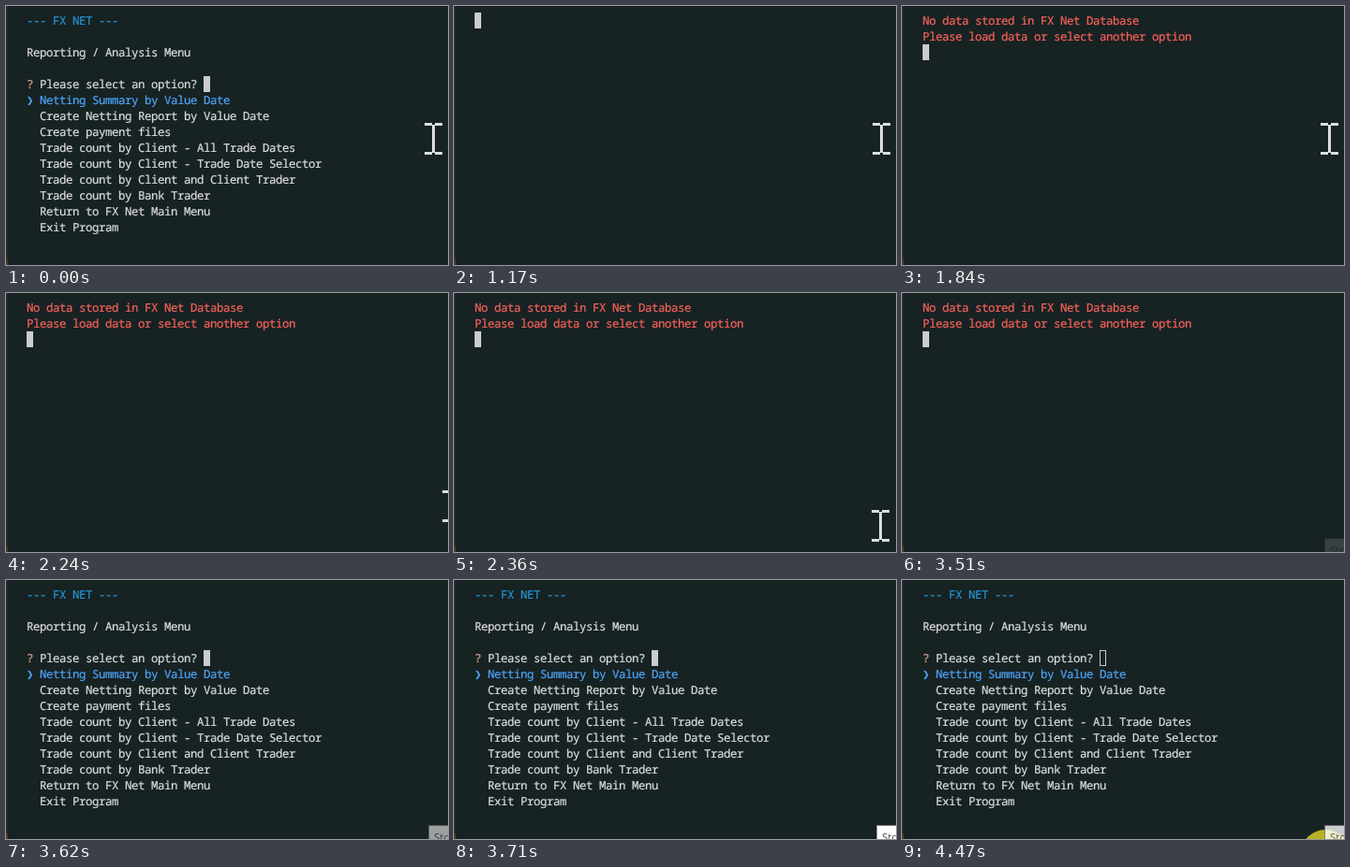
Animation of 472 by 277 pixels, one loop 4500 ms. Source, as an HTML page:

```html
<!DOCTYPE html>
<html lang="en">
<head>
<meta charset="utf-8">
<title>Terminal menu</title>
<style>
  html, body { margin: 0; width: 100%; height: 100%; overflow: hidden; background: #172223; }
  svg { display: block; width: 472px; height: 277px; }
  .term text {
    font: 500 12.3px "Noto Sans Mono", "DejaVu Sans Mono", monospace;
    letter-spacing: -.38px;
    text-rendering: geometricPrecision;
    white-space: pre;
    stroke-width: .2px;
  }
  #tip text { font: 11.5px "Open Sans", "Noto Sans", sans-serif; fill: #4c4c4c; }
</style>
</head>
<body>
<svg viewBox="0 0 472 277">
  <rect width="472" height="277" fill="#172223"/>
  <rect width="2" height="277" fill="#22282b"/>
  <rect y="271" width="2" height="6" fill="#4a3524"/>
  <g id="menu" class="term"></g>
  <g id="alert" class="term"></g>
  <rect id="caret" width="6" height="16" stroke="#cccccc"/>
  <circle id="click" cx="452" cy="293" r="26" fill="#b9b224"/>
  <g id="tip">
    <rect x="451.5" y="262.5" width="40" height="24" fill="#fff" stroke="#7a7a7a"/>
    <text x="457" y="279">Stop</text>
  </g>
  <path id="beam" fill="#dcdcdc" d="M0 0h8v3h-8zM11 0h8v3h-8zM8 2h3v30h-3zM0 31h8v3h-8zM11 31h8v3h-8z"/>
</svg>
<script>
const LOOP = 4500, LEFT = 22, TOP = 7, CELL = 7, ROW = 17;
const GREY = '#dedede', CYAN = '#2296d2', BLUE = '#4da6fa', RED = '#fb625a', MARK = '#d8a58c';
const $ = id => document.getElementById(id);

function write(group, row, col, str, color) {
  const el = document.createElementNS('http://www.w3.org/2000/svg', 'text');
  el.setAttribute('x', LEFT + col * CELL);
  el.setAttribute('y', TOP + row * ROW + 13);
  el.setAttribute('fill', color);
  el.setAttribute('stroke', color);
  el.textContent = str;
  $(group).append(el);
}

write('menu', 0, 0, '--- FX NET ---', CYAN);
write('menu', 2, 0, 'Reporting / Analysis Menu', GREY);
write('menu', 4, 0, '?', MARK);
write('menu', 4, 2, 'Please select an option?', GREY);
write('menu', 5, 0, '❯', BLUE);
[
  'Netting Summary by Value Date',
  'Create Netting Report by Value Date',
  'Create payment files',
  'Trade count by Client - All Trade Dates',
  'Trade count by Client - Trade Date Selector',
  'Trade count by Client and Client Trader',
  'Trade count by Bank Trader',
  'Return to FX Net Main Menu',
  'Exit Program'
].forEach((s, i) => write('menu', 5 + i, 2, s, i ? GREY : BLUE));
write('alert', 0, 0, 'No data stored in FX Net Database', RED);
write('alert', 1, 0, 'Please load data or select another option', RED);

// [time, x, y] of the pointer
const exitPath = [[1960, 447, 125], [1980, 453, 129], [2000, 463, 136], [2020, 474, 145]];
const sweepPath = [[2240, 466, 211], [2300, 453, 219], [2380, 443, 236], [2440, 444, 258], [2490, 447, 279]];

function along(path, t) {
  if (t <= path[0][0]) return path[0].slice(1);
  for (let i = 1; i < path.length; i++) {
    const [a, x, y] = path[i - 1], [b, u, v] = path[i];
    if (t < b) {
      const k = (t - a) / (b - a);
      return [x + (u - x) * k, y + (v - y) * k];
    }
  }
  return path[path.length - 1].slice(1);
}

const show = (id, on) => $(id).setAttribute('visibility', on ? 'visible' : 'hidden');

function caret(col, row, hollow) {
  $('caret').setAttribute('x', LEFT + col * CELL + .5);
  $('caret').setAttribute('y', TOP + row * ROW + .5);
  $('caret').setAttribute('fill', hollow ? 'none' : '#cccccc');
}

function tipAlpha(t) {
  if (t < 3510) return 0;
  if (t < 3710) return (Math.floor((t - 3510) / 33.34) + 1) / 7;
  return t < 4430 ? 1 : t < 4470 ? .9 : .78;
}

function draw(t) {
  const menu = t < 1170 || t >= 3610;
  const alert = t >= 1840 && t < 3610;
  show('menu', menu);
  show('alert', alert);
  if (menu) caret(27, 4, t >= 4430);
  else caret(0, alert ? 2 : 0, false);

  const early = t < 2020;
  show('beam', early || (t >= 2240 && t < 2490));
  const tick = Math.floor(t / 20) * 20;
  const [x, y] = along(early ? exitPath : sweepPath, tick);
  $('beam').setAttribute('transform', `translate(${Math.round(x)} ${Math.round(y)})`);

  $('tip').setAttribute('opacity', tipAlpha(t));
  show('click', t >= 4380);
}

const start = performance.now();
function frame() {
  draw((performance.now() - start) % LOOP);
  requestAnimationFrame(frame);
}
frame();
</script>
</body>
</html>
```
